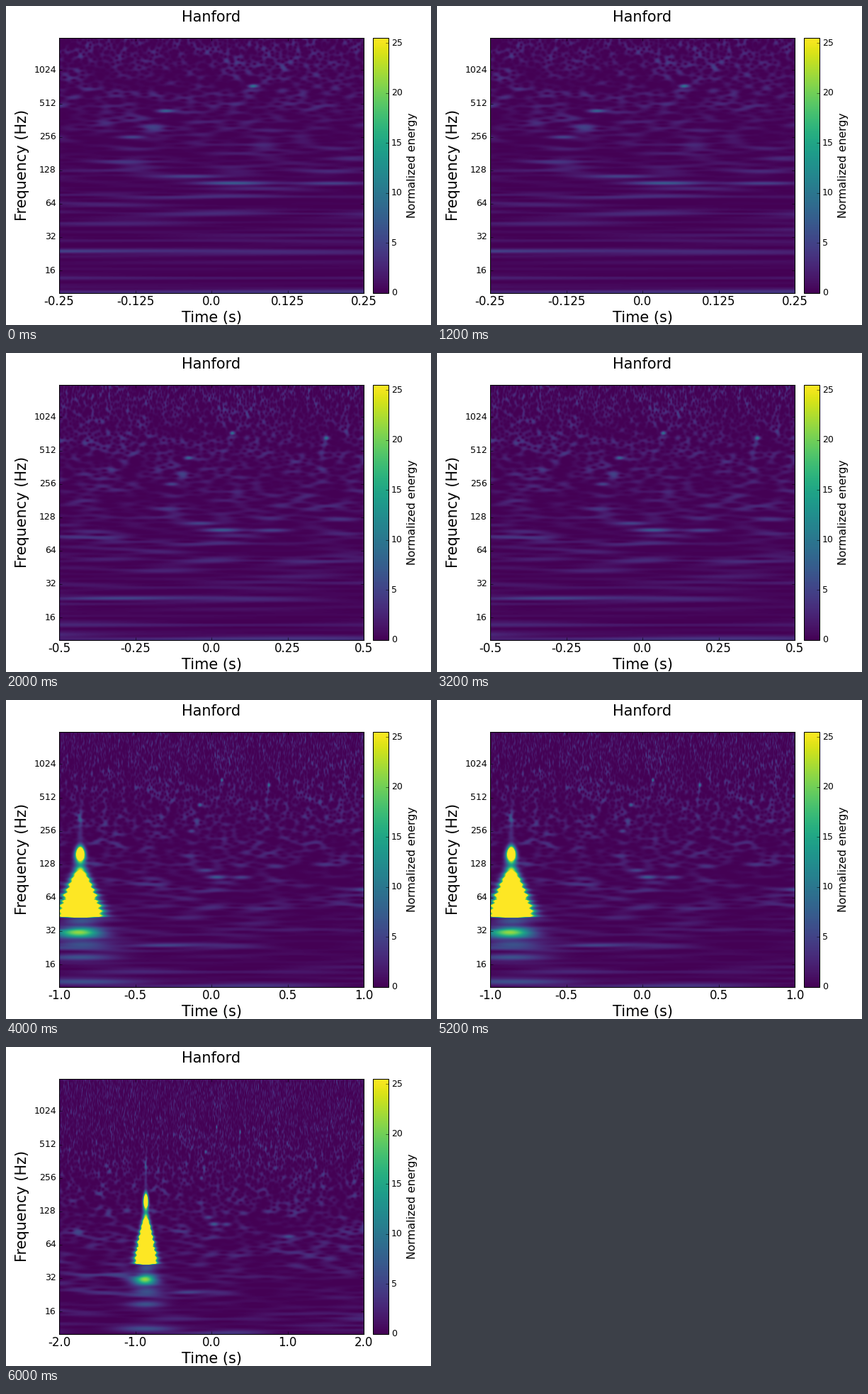
Animation, 600 px wide and 450 px high, one loop 8000 ms. Source, as a matplotlib script:

```python
import numpy as np
import matplotlib.pyplot as plt
from matplotlib.animation import FuncAnimation

WIDTH, HEIGHT, DPI = 600, 450, 75
COLS, ROWS = 430, 360
F_MIN, F_MAX, E_MAX = 10, 2000, 25.5
HALF_SPANS = [0.25 * 2 ** k for k in range(4)]   # seconds either side of zero
BANDWIDTH = 0.036                    # relative width of an analysis tile
BURST_TIME = -0.861
DURATION, BINS = 8, 8192             # noise length in seconds, baseband bins

# Loudest noise tiles: time (s), frequency (Hz), energy
LOUD_TILES = [
    (0.069, 735, 9), (-0.075, 439, 7), (0.376, 663, 8), (-0.13, 255, 5),
    (-0.038, 113, 5), (0.03, 98, 6.5), (0.2, 98, 4), (-0.3, 23.8, 5),
    (1.02, 76, 6),
]

octaves = np.log2(F_MAX / F_MIN)
rows = (np.arange(ROWS) + 0.5) / ROWS * octaves
freqs = F_MIN * 2 ** rows
lengths = 1 / (2 * np.pi * BANDWIDTH * freqs)
windows = [((np.arange(COLS) + 0.5) / COLS * 2 - 1) * h for h in HALF_SPANS]


def bump(center, width):
    """Bell curve over frequency; the width is in octaves."""
    return np.exp(-(np.log2(freqs / center) / width) ** 2)


def noise_maps():
    """Energy of seeded white noise on each time window."""
    rng = np.random.default_rng(14)
    size = F_MAX * DURATION + 2 * BINS
    spectrum = (rng.normal(size=size) + 1j * rng.normal(size=size)) / np.sqrt(2)
    offset = np.arange(BINS) - BINS // 2
    clock = np.arange(BINS) * DURATION / BINS - DURATION / 2
    maps = [np.empty((ROWS, COLS)) for _ in windows]
    for r, f in enumerate(freqs):
        taper = np.exp(-0.5 * (offset / DURATION / (BANDWIDTH * f)) ** 2)
        start = int(round(f * DURATION))
        signal = np.fft.ifft(spectrum[start:start + BINS] * taper) * BINS
        energy = np.abs(signal) ** 2 / np.sum(taper ** 2)
        energy = 6 * np.tanh(0.75 * energy / 6)
        for grid, times in zip(maps, windows):
            grid[r] = np.interp(times, clock, energy)
    return maps


def pulse(times, center, peak, stretch=1):
    """Energy with the given peak per row, fading over each tile's length."""
    spread = (times - center) / (stretch * lengths)[:, None]
    return peak[:, None] * np.exp(-spread ** 2)


def loud_tiles(times):
    return sum(pulse(times, t, energy * bump(f, 1.5 * BANDWIDTH),
                     np.full(ROWS, 1.3))
               for t, f, energy in LOUD_TILES)


def burst(times):
    body = 230 * bump(60, 0.62) / (1 + np.exp((43 - freqs) / 0.3))
    body *= 1 - 0.6 * bump(61.5, 0.04)
    ripple = (freqs > 43) * bump(65, 0.7) * np.sin(2 * np.pi * rows / 0.16)
    peak = body * np.exp(0.15 * ripple)
    peak += 55 * bump(160, 0.2) + 3 * bump(300, 0.5) + 20 * bump(31, 0.17)
    peak += 6 * sum(bump(f, 0.1) for f in (11.2, 18.6, 24, 39.5))
    return pulse(times, BURST_TIME, peak, 1 + 0.06 * ripple)


energies = [noise + loud_tiles(times) + burst(times)
            for noise, times in zip(noise_maps(), windows)]

plt.rcParams.update({"font.family": "DejaVu Sans", "axes.linewidth": 1})
fig = plt.figure(figsize=(WIDTH / DPI, HEIGHT / DPI), dpi=DPI, facecolor="white")


def pixel_axes(left, top, right, bottom):
    return fig.add_axes([left / WIDTH, 1 - bottom / HEIGHT,
                         (right - left) / WIDTH, (bottom - top) / HEIGHT])


def label(x, y, text, size, **style):
    fig.text(x / WIDTH, 1 - y / HEIGHT, text, size=size, ha="center", **style)


ax = pixel_axes(75, 45, 505, 405)
image = ax.imshow(energies[0], origin="lower", aspect="auto", cmap="viridis",
                  vmin=0, vmax=E_MAX, extent=[-1, 1, 0, octaves],
                  interpolation="bilinear")
ticks = 2 ** np.arange(4, 11)
ax.set_yticks(np.log2(ticks / F_MIN), [str(f) for f in ticks], va="center")
ax.set_xticks(np.linspace(-1, 1, 5))
ax.tick_params(direction="in", top=True, right=True, length=4, width=0.5)
ax.tick_params(axis="x", labelsize=16, pad=3)
ax.tick_params(axis="y", labelsize=12, pad=4)

bar_ax = pixel_axes(518, 45, 540, 405)
bar = fig.colorbar(image, cax=bar_ax, ticks=range(0, 26, 5))
bar.outline.set_linewidth(1)
bar_ax.tick_params(direction="in", length=4, width=0.5, pad=4, labelsize=12)
plt.setp(bar_ax.get_yticklabels(), va="center")

label(290, 22, "Hanford", 20)
label(290, 446, "Time (s)", 20)
label(23.5, 224.8, "Frequency (Hz)", 20, rotation=90, va="center")
label(573.5, 224.5, "Normalized energy", 15, rotation=90, va="center")


def update(frame):
    image.set_data(energies[frame])
    half = HALF_SPANS[frame]
    ax.set_xticklabels([str(k * half / 2) for k in range(-2, 3)])
    return [image]


anim = FuncAnimation(fig, update, frames=len(HALF_SPANS), interval=2000,
                     repeat=True, repeat_delay=0)
plt.show()
```
